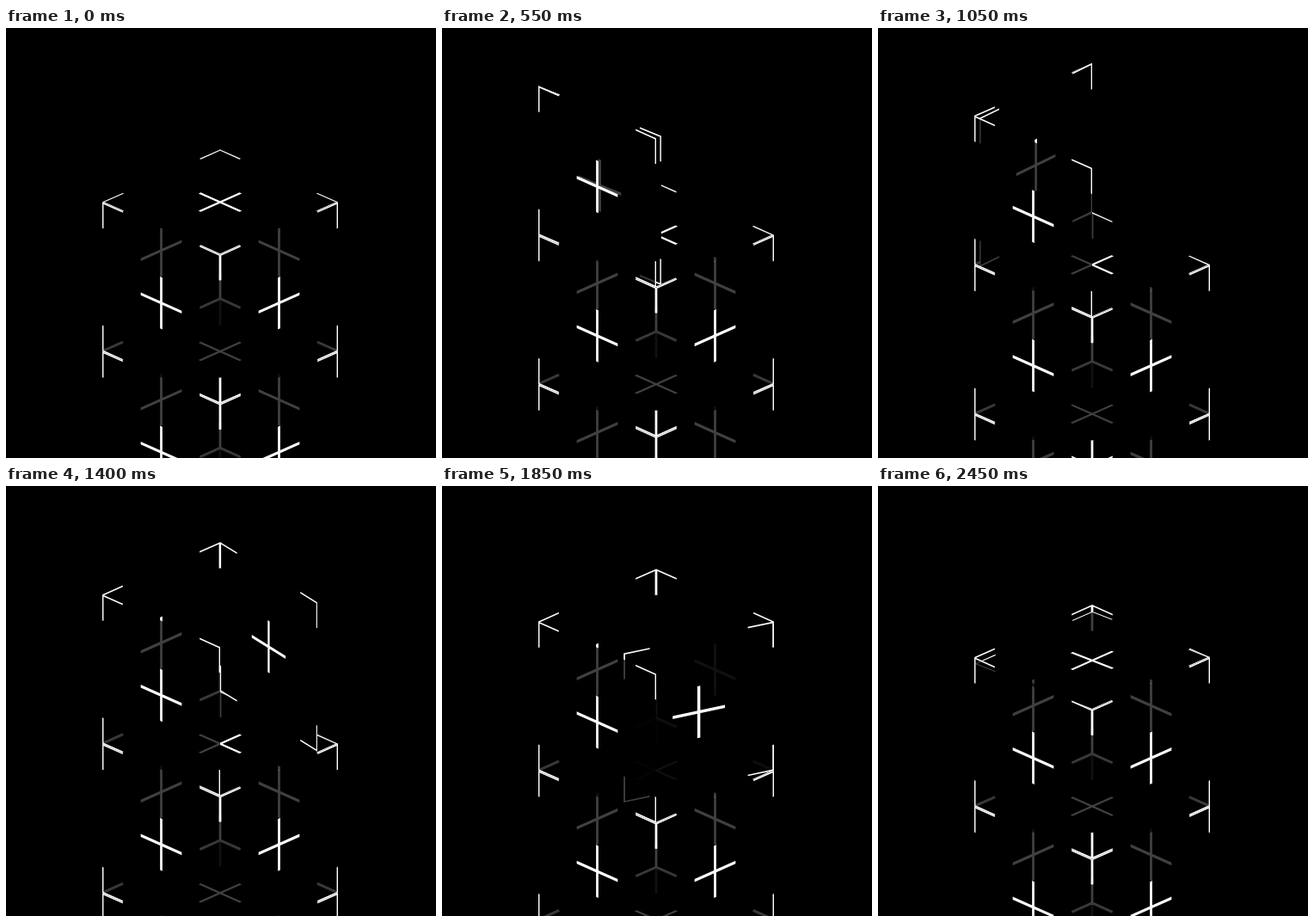
Recreate the animation shown at these times as an HTML page. Size 500 by 500 pixels, loop 2.5 s.

```html
<!DOCTYPE html>
<html lang="en">
<head>
<meta charset="utf-8">
<title>Unfolding tower</title>
<style>
  html, body { margin: 0; width: 100%; height: 100%; overflow: hidden; background: #000; }
  svg { display: block; width: 100%; height: 100%; }
</style>
</head>
<body>
<svg id="stage" viewBox="0 0 500 500"></svg>
<script>
const NS = 'http://www.w3.org/2000/svg';
const stage = document.getElementById('stage');

const LOOP = 2500, STEP = 50;
const CX = 249, TOP = 141.5;          // back corner of the floor at time 0
const A = 137, B = 61, H = 173.5;     // projected half width, half depth, height
const SEE_THROUGH = 0.25;
const TICK = 17.4, W = 1;             // mark length and weight, in % of a panel

// Axes on screen: u runs to the left corner, v to the right one, z up.
const u = [-A, B], v = [A, B], z = [0, -H];
const neg = p => [-p[0], -p[1]];
const add = (p, q) => [p[0] + q[0], p[1] + q[1]];
const swing = (from, to, angle) => {
  const c = Math.cos(angle), s = Math.sin(angle);
  return [from[0] * c + to[0] * s, from[1] * c + to[1] * s];
};

// Each panel: hinge origin and its two edge vectors at a swing angle.
const panels = [
  a => [u, v, swing(neg(u), z, a)],            // front left, rises from the floor
  a => [u, swing(v, neg(u), a), z],            // back left
  a => [[0, 0], swing(u, v, a), z],            // back right
  a => [v, swing(neg(v), u, a), z],            // front right
  a => [add(v, z), u, swing(neg(z), neg(v), a)] // lid
];
const paintOrder = [1, 2, 4, 3, 0];

const box = (x, y, w, h) => `M${x} ${y}h${w}v${h}h${-w}z`;
const marks = [
  box(50 - TICK, 50 - W, 2 * TICK, 2 * W),
  box(50 - W, 50 - TICK, 2 * W, 2 * TICK)
];
for (const right of [0, 1]) for (const far of [0, 1]) {
  marks.push(box(right * (100 - TICK), far * (100 - W), TICK, W));
  marks.push(box(right * (100 - W), far * (100 - TICK), W, TICK));
}
const markPath = marks.join('');

function make(tag, parent, attrs = {}) {
  const el = document.createElementNS(NS, tag);
  for (const k in attrs) el.setAttribute(k, attrs[k]);
  return parent.appendChild(el);
}

function makeLevel() {
  const root = make('g', stage);
  const parts = [];
  for (const i of paintOrder) {
    const g = make('g', root);
    const face = make('rect', g, { width: 100, height: 100, fill: '#000' });
    make('path', g, { d: markPath, fill: '#fff' });
    parts[i] = { g, face };
  }
  return { root, parts };
}

// Panels that have not opened yet lie stacked on the one that is moving.
function pose(level, progress) {
  const active = Math.floor(progress);
  const p = progress - active;
  const ease = p * p * (3 - 2 * p);
  level.parts.forEach(({ g, face }, i) => {
    g.setAttribute('display', i > active ? 'none' : 'inline');
    if (i > active) return;
    const moving = i === active;
    const [o, e, f] = panels[i]((moving ? ease : 1) * Math.PI / 2);
    const m = [...e, ...f].map(n => (n / 100).toFixed(5));
    g.setAttribute('transform', `matrix(${m.join(' ')} ${o[0]} ${o[1]})`);
    const layers = moving ? panels.length - active : 1;
    face.setAttribute('fill-opacity', 1 - SEE_THROUGH ** layers);
  });
}

const levels = [3, 2, 1, 0].map(depth => ({ depth, ...makeLevel() }));
levels.forEach(level => pose(level, panels.length));
const growing = levels[levels.length - 1];

function draw(ms) {
  const t = Math.floor((ms % LOOP) / STEP) * STEP / LOOP;
  for (const { root, depth } of levels) {
    root.setAttribute('transform', `translate(${CX} ${TOP + H * (t + depth)})`);
  }
  pose(growing, t * panels.length + 1e-9);
}

let start;
function tick(now) {
  if (start === undefined) start = now;
  draw(Math.max(0, now - start));
  requestAnimationFrame(tick);
}
draw(0);
requestAnimationFrame(tick);
</script>
</body>
</html>
```
